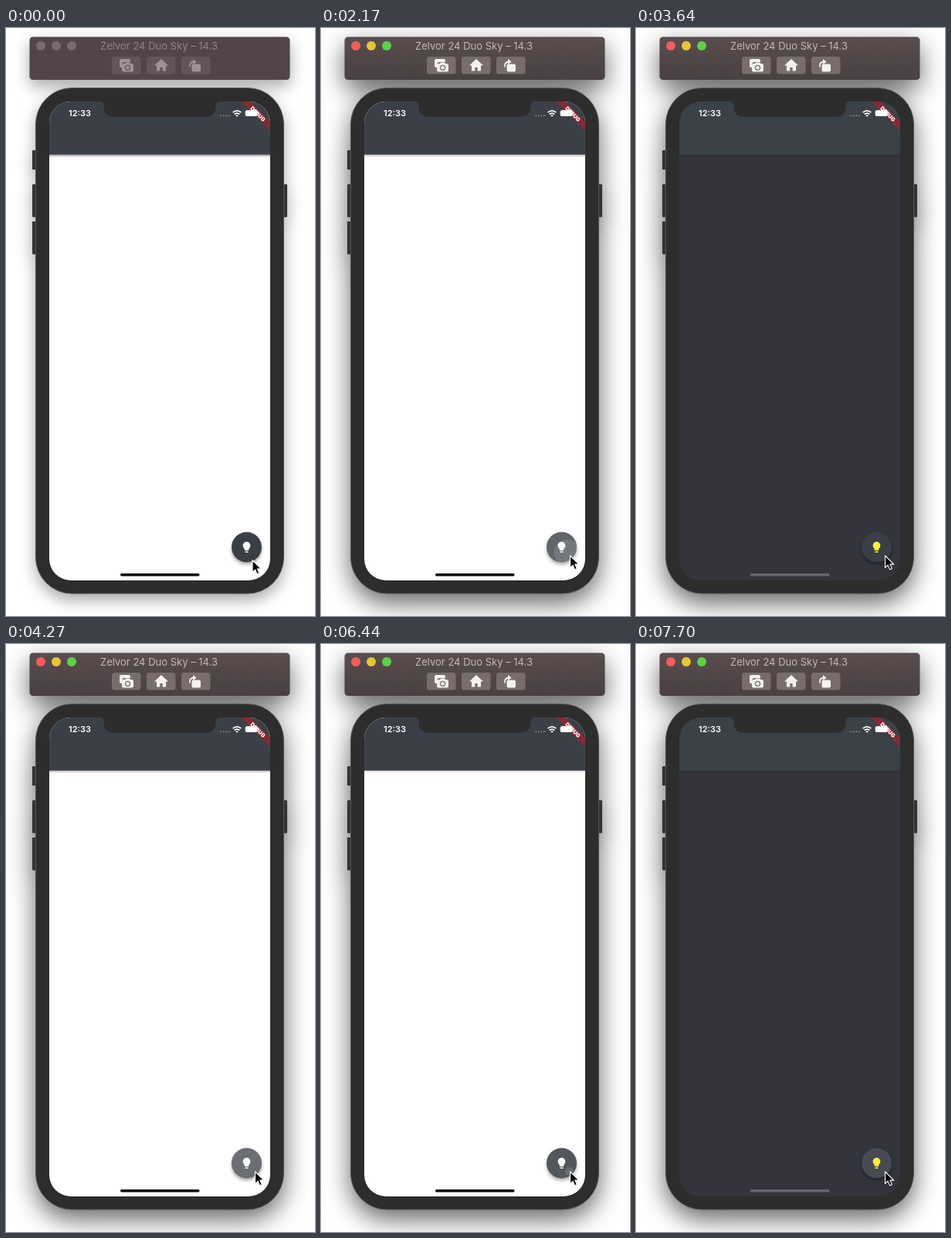
These frames come from a looping animation (400 by 760 pixels, 7.77 s). An HTML page:

```html
<!DOCTYPE html>
<html lang="en">
<head>
<meta charset="utf-8">
<title>Theme toggle</title>
<style>
  html, body { margin: 0; width: 100%; height: 100%; overflow: hidden; background: #fff; }
  svg { display: block; width: 100%; height: 100%; }
  text { font-family: Inter, Roboto, sans-serif; }

  #window { filter: drop-shadow(0 12px 16px rgba(0, 0, 0, .6)); }
  .idle #window { filter: drop-shadow(0 8px 10px rgba(0, 0, 0, .34)); }

  .bar { fill: url(#barFill); }
  .title { fill: #c1b8b9; font-size: 13px; text-anchor: middle; }
  .key { fill: #786c6d; }
  .glyph { fill: #f3f0f0; stroke: none; }
  .idle .bar { fill: #52454a; }
  .idle .title { fill: #8f8387; }
  .idle .key { fill: #625559; }
  .idle .glyph { fill: #9d9397; }
  .idle .lamp { fill: #786a6e; }

  .page { fill: #fff; }
  .appbar { fill: #3b4048; }
  .home { fill: #000; }
  .bulb { fill: #fff; }
  .dark .page { fill: #34343d; }
  .dark .appbar { fill: #3a4148; }
  .dark .home { fill: #69656a; }
  .dark .bulb { fill: #ffee3b; }
</style>
</head>
<body>
<svg id="stage" class="idle" viewBox="0 0 400 760" preserveAspectRatio="none">
  <defs>
    <linearGradient id="barFill" x2="0" y2="1">
      <stop stop-color="#594d4e"/>
      <stop offset="1" stop-color="#4a4041"/>
    </linearGradient>
    <linearGradient id="edgeFill" x2="0" y2="1">
      <stop stop-color="#000" stop-opacity=".38"/>
      <stop offset="1" stop-color="#000" stop-opacity="0"/>
    </linearGradient>
    <filter id="soft" x="-50%" y="-50%" width="200%" height="200%">
      <feGaussianBlur stdDeviation="2.5"/>
    </filter>
    <clipPath id="screen"><rect x="56" y="95" width="286" height="619" rx="28"/></clipPath>
    <clipPath id="disc"><circle cx="311.5" cy="671" r="19.5"/></clipPath>
  </defs>

  <g id="window">
    <rect class="bar" x="30.5" y="11.5" width="337" height="55.5" rx="4.5"/>
    <g fill="#343434">
      <rect x="34" y="158" width="6" height="25" rx="1"/>
      <rect x="34" y="202" width="6" height="42.5" rx="1"/>
      <rect x="34" y="250" width="6" height="42.5" rx="1"/>
      <rect x="358" y="202" width="6" height="42.5" rx="1"/>
    </g>
    <rect x="38.5" y="77.5" width="321" height="653.5" rx="47" fill="#2d2d2d" stroke="#555" stroke-width="1"/>
  </g>

  <circle class="lamp" cx="45" cy="23" r="6" fill="#ee5f5c"/>
  <circle class="lamp" cx="65" cy="23" r="6" fill="#e5c53e"/>
  <circle class="lamp" cx="85" cy="23" r="6" fill="#60d04a"/>
  <text class="title" x="198" y="28">Zelvor 24 Duo Sky – 14.3</text>
  <g class="key">
    <rect x="137" y="37" width="37.5" height="22.5" rx="3.5"/>
    <rect x="182" y="37" width="37.5" height="22.5" rx="3.5"/>
    <rect x="227" y="37" width="37.5" height="22.5" rx="3.5"/>
  </g>
  <g class="glyph">
    <!-- camera -->
    <path d="M149 40h10q2 0 2 2v2h-8q-2 0-3 3v4h-1q-2 0-2-2v-7q0-2 2-2z"/>
    <path d="M152 46h2l1-1.500h5l1 1.500h2q2 0 2 2v6.500q0 2-2 2h-11q-2 0-2-2v-6.500q0-2 2-2z"/>
    <circle class="key" cx="157.500" cy="51.300" r="3.600"/>
    <circle cx="157.500" cy="51.300" r="2.400"/>
    <!-- home -->
    <path d="M201 40l8.500 8-1.200 1.200-1.300-1.100v7.400h-4.300v-4.500h-3.400v4.500H195v-7.400l-1.300 1.100-1.200-1.200z"/>
    <!-- rotate -->
    <rect x="240.500" y="46.500" width="11.500" height="10" rx="2"/>
    <path d="M237 50.500q-.5-7 5-7.700V40l4.500 3.700-4.500 3.600v-2.600q-3.500.8-3.300 5.800z"/>
  </g>

  <g clip-path="url(#screen)">
    <rect class="page" x="56" y="95" width="286" height="619"/>
    <rect id="edge" x="56" y="163.500" width="286" height="4" fill="url(#edgeFill)"/>
    <rect class="appbar" x="56" y="95" width="286" height="68.700"/>

    <circle cx="311.500" cy="674" r="19" fill="#000" opacity=".4" filter="url(#soft)"/>
    <circle cx="311.500" cy="671" r="19.500" fill="#3a3f46"/>
    <g clip-path="url(#disc)" fill="#fff">
      <circle id="glow" cx="311.500" cy="671" r="19.500"/>
      <circle id="splash"/>
    </g>
    <path class="bulb" transform="translate(303.220 662.720) scale(.69)"
      d="M9 21c0 .55.45 1 1 1h4c.55 0 1-.45 1-1v-1H9zM12 2C8.140 2 5 5.140 5 9c0 2.380 1.190 4.470 3 5.740V17c0 .55.45 1 1 1h6c.55 0 1-.45 1-1v-2.260c1.810-1.270 3-3.360 3-5.740 0-3.860-3.140-7-7-7z"/>
    <rect class="home" x="148" y="705" width="102.500" height="3.500" rx="1.750"/>

    <path d="M304 95h12l26 26v12z" fill="#89283300"/>
    <path d="M304 95h12l26 26v12z" fill="#842a35"/>
    <text transform="translate(326 111) rotate(45)" y="2.500" text-anchor="middle"
      font-size="7" font-weight="900" fill="#fff">DEBUG</text>
  </g>

  <path d="M120 94.500q6.500 0 6.500 6.500 0 14 14 14h117q14 0 14-14 0-6.500 6.500-6.500z" fill="#2d2d2d"/>
  <text x="81" y="114.300" font-size="11" font-weight="600" fill="#fff">12:33</text>
  <g fill="#777b81">
    <circle cx="278" cy="113.300" r="1.100"/>
    <circle cx="281.600" cy="113.300" r="1.100"/>
    <circle cx="285.200" cy="113.300" r="1.100"/>
    <circle cx="288.800" cy="113.300" r="1.100"/>
  </g>
  <g fill="none" stroke="#fff" stroke-width="1.700">
    <path d="M293.600 109.200q5.400-4.600 10.800 0"/>
    <path d="M295.700 111.500q3.300-2.800 6.600 0"/>
  </g>
  <path d="M297.200 112.900q1.800-1.300 3.600 0l-1.800 1.900z" fill="#fff"/>
  <rect x="309.700" y="106.300" width="15.800" height="7.700" rx="2" fill="#fff"/>
  <path d="M326.500 108.800q1.300 1.300 0 2.700z" fill="#c5b5b9"/>

  <path id="pointer" d="M0 0v15.500l3.600-3.400 2.500 5.800 2.700-1.200-2.500-5.600h5z"
    fill="#000" stroke="#fff" stroke-width="1.100" stroke-linejoin="round"/>
</svg>

<script>
const LOOP = 7770, TICK = 70;
const FOCUS = 560;

// [switch time, how far ahead the touch feedback runs]
const TAPS = [[910, 0], [2100, 0], [3360, 0], [4200, 70], [5320, 0], [6440, 0], [7700, -40]];

// Tables of [ms from the switch, value]
const GLOW = [[-110, 0], [-70, .03], [0, .12], [70, .2], [140, .18], [210, .09], [280, 0]];
const SPLASH_SIZE = [[-40, 0], [0, 5.5], [70, 17], [140, 34], [280, 44]];
const SPLASH_ALPHA = [[-40, 0], [0, .12], [70, .12], [140, .08], [210, .04], [280, 0]];
const MOVE_X = [[0, 319], [210, 322.5]];
const MOVE_Y = [[0, 688], [210, 682]];

const $ = id => document.getElementById(id);
const stage = $("stage"), edge = $("edge"), glow = $("glow"), splash = $("splash"), pointer = $("pointer");

function at(table, t) {
  if (t <= table[0][0]) return table[0][1];
  for (let i = 1; i < table.length; i++) {
    const [t0, a] = table[i - 1], [t1, b] = table[i];
    if (t < t1) return a + (b - a) * (t - t0) / (t1 - t0);
  }
  return table[table.length - 1][1];
}

function set(node, values) {
  for (const name in values) node.setAttribute(name, values[name]);
}

function draw(t) {
  const done = TAPS.filter(([time]) => time <= t);
  const dark = done.length % 2 === 1;
  const age = done.length ? t - done[done.length - 1][0] : LOOP;
  const [time, lead] = TAPS.find(([s]) => t <= s + 350) || TAPS[TAPS.length - 1];
  const touch = t - time + lead;

  stage.classList.toggle("idle", t < FOCUS);
  stage.classList.toggle("dark", dark);
  set(edge, { opacity: dark ? .35 : Math.min(1, .3 + age / 200) });
  set(glow, { opacity: at(GLOW, touch) });

  const size = at(SPLASH_SIZE, touch);
  const drift = Math.min(1, size / 44);
  set(splash, {
    cx: 323 - 11.5 * drift,
    cy: 683 - 12 * drift,
    r: size,
    opacity: at(SPLASH_ALPHA, touch)
  });
  set(pointer, { transform: `translate(${at(MOVE_X, t)} ${at(MOVE_Y, t)})` });
}

const start = performance.now();
function frame() {
  const t = (performance.now() - start) % LOOP;
  draw(Math.floor(t / TICK) * TICK);
  requestAnimationFrame(frame);
}
draw(0);
requestAnimationFrame(frame);
</script>
</body>
</html>
```
